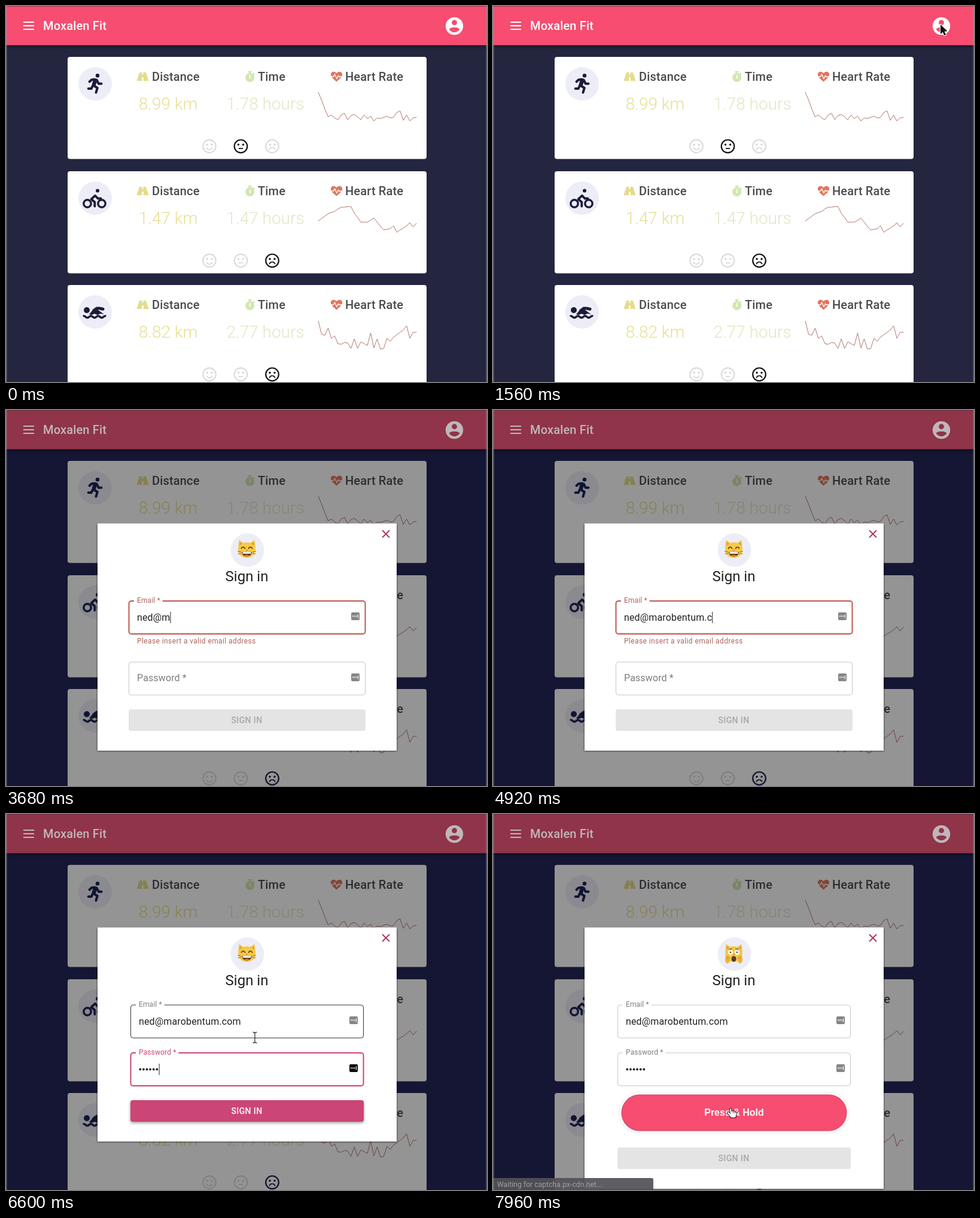
Recreate the animation shown at these times as an HTML page with a canvas. Size 804 by 628 pixels, loop 8000 ms.

```html
<!DOCTYPE html>
<html lang="en">
<head>
<meta charset="utf-8">
<title>Workout dashboard</title>
<style>
  html, body { margin: 0; width: 100%; height: 100%; overflow: hidden; background: #24263f; }
  canvas { display: block; width: 804px; height: 628px; }
</style>
</head>
<body>
<canvas id="stage" width="804" height="628"></canvas>
<script>
const ctx = document.getElementById('stage').getContext('2d');
const W = 804, H = 628, LOOP = 8000;
const PINK = '#f64d70', BUTTON = '#cc4577', INK = '#1b1c38', ERROR = '#bd574f';
const EMAIL = 'ned@marobentum.com';

// Moments in ms
const OPEN = 1560, FOCUS_EMAIL = 2560, TYPE_EMAIL = 3200, EMAIL_STEP = 110;
const FOCUS_PASS = 5260, TYPE_PASS = 5420, PASS_STEP = 150;
const SUBMIT = 7240, CHALLENGE = 7600;

const clamp = v => Math.max(0, Math.min(1, v));
const ease = v => v * v * (3 - 2 * v);
const span = (t, from, length) => ease(clamp((t - from) / length));
const lerp = (a, b, k) => a + (b - a) * k;
const typed = (t, from, step, max) => t < from ? 0 : Math.min(max, 1 + Math.floor((t - from) / step));

function mix(a, b, k) {
  const part = (c, i) => parseInt(c.slice(i, i + 2), 16);
  return `rgb(${[1, 3, 5].map(i => Math.round(lerp(part(a, i), part(b, i), k))).join(',')})`;
}
function rect(x, y, w, h, color, r = 0) {
  ctx.beginPath();
  ctx.roundRect(x, y, w, h, r);
  ctx.fillStyle = color;
  ctx.fill();
}
function oval(x, y, rx, color, ry = rx) {
  ctx.beginPath();
  ctx.ellipse(x, y, rx, ry, 0, 0, 7);
  ctx.fillStyle = color;
  ctx.fill();
}
function trace(points) {
  ctx.beginPath();
  for (let i = 0; i < points.length; i += 2) ctx.lineTo(points[i], points[i + 1]);
}
function line(points, color, width, cap = 'round') {
  trace(points);
  ctx.strokeStyle = color;
  ctx.lineWidth = width;
  ctx.lineCap = cap;
  ctx.lineJoin = 'round';
  ctx.stroke();
}
function poly(points, color) {
  trace(points);
  ctx.fillStyle = color;
  ctx.fill();
}
function arc(x, y, r, from, to, color, width) {
  ctx.beginPath();
  ctx.arc(x, y, r, from, to);
  ctx.strokeStyle = color;
  ctx.lineWidth = width;
  ctx.lineCap = 'round';
  ctx.stroke();
}
function text(str, x, y, size, color, { weight = 400, align = 'left', gap = 0, family = 'Roboto' } = {}) {
  ctx.font = `${weight} ${size}px ${family}, sans-serif`;
  ctx.letterSpacing = gap + 'px';
  ctx.textAlign = align;
  ctx.fillStyle = color;
  ctx.fillText(str, x, y);
  return ctx.measureText(str).width;
}
function at(x, y, draw) {
  ctx.save();
  ctx.translate(x, y);
  draw();
  ctx.restore();
}

// Sport icons
function runner() {
  at(135.5, 28, () => {
    oval(17.5, 3.2, 3.2, INK);
    line([4, 13.5, 7.5, 10.3, 13, 9.5, 16, 11], INK, 4);
    line([13.5, 11.5, 11.3, 18.5], INK, 6.5);
    line([16, 10.5, 19.3, 16.8, 24, 16.8], INK, 4);
    line([11, 20, 17.3, 23.8, 15, 31.5], INK, 4);
    line([2.2, 25, 7.2, 25, 9, 21], INK, 4);
  });
}
function cyclist() {
  at(128, 29.5, () => {
    arc(8, 24.5, 6.2, 0, 7, INK, 3.4);
    arc(32, 24.5, 6.2, 0, 7, INK, 3.4);
    oval(25, 3, 3, INK);
    line([20.3, 29, 20.3, 22, 14.5, 17.2, 21, 11.2, 25.5, 16, 30.5, 16], INK, 3.8);
  });
}
function swimmer() {
  at(128, 30.5, () => {
    oval(7, 11.5, 5, INK);
    poly([11, 18.5, 18, 10, 25, 10.5, 36, 18.5, 30, 17.3, 25, 19.5, 20, 17.5, 15, 19.5], INK);
    line([19, 12, 24, 8.4, 28, 8.4, 34, 9.8], INK, 5);
    const wave = [];
    for (let x = 2; x <= 38; x++) wave.push(x, 22.7 - 1.5 * Math.cos((x - 2) * Math.PI / 6));
    line(wave, INK, 3.4);
  });
}

const CARDS = [
  { y: 85, icon: runner, distance: '8.99 km', time: '1.78 hours', mood: 1,
    pulse: [59, 72, 87, 100, 97, 102, 105, 97, 94, 105, 98, 96, 100, 105, 97, 103, 99, 107, 102,
      103, 101, 99, 102, 101, 93, 90, 106, 97, 107, 102, 101] },
  { y: 276, icon: cyclist, distance: '1.47 km', time: '1.47 hours', mood: 2,
    pulse: [83, 79, 75, 71, 69, 67, 63, 60, 60, 59, 59, 70, 77, 85, 85, 85, 82, 78, 85, 92, 98,
      97, 96, 91, 102, 98, 95, 91, 86, 93, 87] },
  { y: 466, icon: swimmer, distance: '8.82 km', time: '2.77 hours', mood: 2,
    pulse: [60, 82, 84, 72, 89, 85, 98, 99, 96, 97, 106, 90, 106, 95, 98, 101, 80, 105, 90, 107,
      106, 89, 94, 87, 83, 79, 75, 68, 89, 79, 79] }
];

function road(x, y) {
  poly([x + 4.5, y, x + 15.5, y, x + 20, y + 14, x, y + 14], '#e5dc8b');
  line([x + 10, y, x + 10, y + 4], '#fff', 1.8, 'butt');
  line([x + 10, y + 8, x + 10, y + 14], '#fff', 2.6, 'butt');
}
function stopwatch(x, y) {
  const c = '#d2e7b3';
  oval(x, y, 7.6, c);
  line([x - 2.2, y - 9.5, x + 2.2, y - 9.5], c, 2.4);
  line([x, y - 9, x, y - 6], c, 2.4);
  line([x + 5.5, y - 6.5, x + 6.5, y - 5.5], c, 2.6);
  line([x, y - 3.5, x, y + 1], '#fff', 1.8);
}
function heart(x, y) {
  at(x, y, () => {
    ctx.beginPath();
    ctx.moveTo(0, 8.5);
    ctx.bezierCurveTo(-4, 4.5, -9.6, 1, -9.6, -3.5);
    ctx.bezierCurveTo(-9.6, -8.7, -3, -10, 0, -5.6);
    ctx.bezierCurveTo(3, -10, 9.6, -8.7, 9.6, -3.5);
    ctx.bezierCurveTo(9.6, 1, 4, 4.5, 0, 8.5);
    ctx.fillStyle = '#e2755f';
    ctx.fill();
    line([-9.5, 0, -5, 0, -3, -4, 0.5, 3.5, 3, -1.5, 4, 0, 9.5, 0], '#fff', 1.4);
  });
}
function face(x, y, mood, chosen) {
  const c = chosen ? '#151515' : '#d8d8d8';
  arc(x, y, 10.8, 0, 7, c, chosen ? 2.2 : 1.9);
  oval(x - 4, y - 2.8, 1.7, c);
  oval(x + 4, y - 2.8, 1.7, c);
  if (mood === 0) arc(x, y + 0.8, 5, 0.4, Math.PI - 0.4, c, 1.7);
  if (mood === 1) line([x - 3.6, y + 3.6, x + 3.6, y + 3.6], c, 1.8, 'butt');
  if (mood === 2) arc(x, y + 7.2, 5, Math.PI + 0.4, -0.4, c, 1.7);
}
function card({ y, icon, distance, time, mood, pulse }) {
  at(0, y, () => {
    rect(103, 0, 600, 170.5, '#fff', 4);
    oval(149, 45, 28, '#ededf8');
    icon();
    road(218.5, 26);
    stopwatch(407.7, 34.5);
    heart(552.5, 33);
    const head = { weight: 500, gap: 0.15 };
    text('Distance', 244, 40, 20, '#4b4b4d', head);
    text('Time', 421, 40, 20, '#4b4b4d', head);
    text('Heart Rate', 567, 40, 20, '#4b4b4d', head);
    text(distance, 271, 88, 28, '#e6df91', { weight: 300, align: 'center' });
    text(time, 433.5, 88, 28, '#dde8c4', { weight: 300, align: 'center' });
    line(pulse.flatMap((v, i) => [522 + i * 164 / 30, v]), '#b3766c', 1);
    for (let i = 0; i < 3; i++) face(340 + i * 52.5, 149.3, i, i === mood);
  });
}

function topBar(dim) {
  const back = mix(PINK, '#8f3449', dim), front = mix('#ffffff', '#c0b6b9', dim);
  ctx.save();
  ctx.shadowColor = 'rgba(0,0,0,.45)';
  ctx.shadowBlur = 6;
  ctx.shadowOffsetY = 2;
  rect(0, 0, W, 65.5, back);
  ctx.restore();
  for (let y = 26; y <= 38; y += 6) rect(29, y, 18, 2, front);
  text('Moxalen Fit', 62, 40, 20, front, { weight: 500, gap: 0.15 });
  at(749.5, 33.5, () => {
    oval(0, 0, 14.7, front);
    oval(0, -5.8, 4.4, back);
    ctx.beginPath();
    ctx.moveTo(-8.8, 5.8);
    ctx.bezierCurveTo(-8.5, 1, 8.5, 1, 8.8, 5.8);
    ctx.quadraticCurveTo(5, 10.5, 0, 10.5);
    ctx.quadraticCurveTo(-5, 10.5, -8.8, 5.8);
    ctx.fillStyle = back;
    ctx.fill();
  });
}

function cat(x, y, scared) {
  at(x, y, () => {
    const fur = '#f6c945', dark = '#5b3a1c';
    for (const s of [-1, 1]) {
      poly([s * 13, -16, s * 14.5, -2, s * 3, -9], fur);
      poly([s * 11.8, -12.5, s * 12.3, -5, s * 6.5, -9], '#e0965a');
    }
    oval(0, 1, 14.5, fur, 13);
    if (scared) {
      for (const s of [-1, 1]) {
        oval(s * 5.5, -2, 4.2, '#fff');
        oval(s * 5.5, -2, 1.3, dark);
        line([s * 3, -8, s * 8, -7], dark, 1);
      }
      oval(0, 9, 4, dark, 4.8);
      for (const s of [-1, 1]) {
        oval(s * 10.5, 10, 4, '#e9b33a', 6.5);
        line([s * 8.5, 5, s * 8.5, 9], '#c98b25', 0.8);
        line([s * 11, 4.5, s * 11, 9], '#c98b25', 0.8);
      }
    } else {
      for (const s of [-1, 1]) {
        arc(s * 6, -1, 3, Math.PI + 0.2, -0.2, dark, 1.6);
        line([s * 10, 4, s * 15, 3], dark, 0.7);
        line([s * 10, 6.5, s * 14.5, 7.5], dark, 0.7);
      }
      ctx.beginPath();
      ctx.moveTo(-8.5, 4);
      ctx.lineTo(8.5, 4);
      ctx.bezierCurveTo(8, 14, -8, 14, -8.5, 4);
      ctx.fillStyle = dark;
      ctx.fill();
      rect(-7.2, 4.2, 14.4, 2.8, '#fff', 1);
      oval(0, 9.8, 3.6, '#e0685a', 1.4);
    }
    poly([-1.8, 0.8, 1.8, 0.8, 0, 2.8], '#c4694f');
  });
}

function field(x, y, w, label, state) {
  const { raise, focus, error, hover, dark } = state;
  const edge = error ? ERROR : focus ? BUTTON : hover ? '#303030' : '#c6c6c6';
  const thick = focus ? 2 : 1;
  ctx.beginPath();
  ctx.roundRect(x + 0.5, y, w - 1, 55, 4);
  ctx.strokeStyle = edge;
  ctx.lineWidth = thick;
  ctx.stroke();
  if (raise > 0) {
    ctx.font = '400 12px Roboto, sans-serif';
    ctx.letterSpacing = '0.12px';
    rect(x + 9, y - 2, (ctx.measureText(label).width + 9) * raise, 4, '#fff');
  }
  const tint = error ? '#b2635c' : focus ? BUTTON : '#7d7d7d';
  text(label, x + 14, y + lerp(32, 3, raise), lerp(16, 12, raise), tint, { gap: 0.13 });
  at(x + w - 24, y + 19, () => {
    rect(0, 0, 14, 13, dark ? '#0c0c0c' : '#868686', 2);
    for (let i = 0; i < 3; i++) rect(2 + i * 2.8, 5.5, 1.8, 1.8, '#fff');
    rect(10.8, 3.5, 1.2, 6, '#fff');
  });
}
function caret(x, y, t, since) {
  if ((t - since) % 1000 < 500) rect(x, y + 18, 1, 19, '#222');
}
function helper(str, x, y) {
  text(str, x + 14, y + 71, 12, '#ad645d', { gap: 0.4 });
}

function dialog(t) {
  const chars = typed(t, TYPE_EMAIL, EMAIL_STEP, EMAIL.length);
  const dots = typed(t, TYPE_PASS, PASS_STEP, 6);
  const mail = EMAIL.slice(0, chars);
  const badMail = chars > 0 && !/@\w+\.\w{2,}$/.test(mail);
  const badPass = dots > 0 && dots < 6;
  const bad = badMail || badPass;
  const challenge = t >= CHALLENGE;
  const x = bad ? 205 : 208, w = bad ? 396 : 390;
  const passY = badMail ? 421 : 399;
  const buttonY = challenge ? 557 : bad ? 500 : 478;

  ctx.save();
  ctx.shadowColor = 'rgba(0,0,0,.75)';
  ctx.shadowBlur = 3;
  ctx.shadowOffsetY = 1;
  rect(153, 189.5, 500, buttonY + 69 - 189.5, '#fff');
  ctx.restore();
  line([629, 201, 641, 213], '#a93c5e', 2, 'butt');
  line([641, 201, 629, 213], '#a93c5e', 2, 'butt');
  oval(403.5, 234, 28, '#ededf8');
  cat(402.5, 233, t >= SUBMIT);
  text('Sign in', 402.5, 286, 24, '#222', { align: 'center' });

  const onMail = t >= FOCUS_EMAIL && t < FOCUS_PASS;
  const onPass = t >= FOCUS_PASS && t < SUBMIT - 60;
  field(x, 319, w, 'Email *', {
    raise: span(t, FOCUS_EMAIL, 200), focus: onMail, error: badMail, hover: t > 2380 && t < 6620
  });
  const mailWidth = text(mail, x + 14, 352, 16, '#222', { gap: 0.15 });
  if (onMail) caret(x + 14 + mailWidth, 319, t, chars ? Math.min(t, TYPE_EMAIL + (chars - 1) * EMAIL_STEP) : FOCUS_EMAIL);
  if (badMail) helper('Please insert a valid email address', x, 319);

  field(x, passY, w, 'Password *', {
    raise: span(t, FOCUS_PASS, 200), focus: onPass, error: badPass,
    hover: t >= 6620 && t < 6820, dark: onPass
  });
  for (let i = 0; i < dots; i++) oval(x + 16.3 + i * 5.6, passY + 27.5, 1.9, '#222');
  if (onPass) caret(x + 14 + dots * 5.6, passY, t, dots ? TYPE_PASS + (dots - 1) * PASS_STEP : FOCUS_PASS);
  if (badPass) helper('Password must be at least 6 characters long', x, passY);

  if (challenge) {
    rect(209, 463, 388, 72, '#fbf6f8', 36);
    rect(214.5, 468.5, 377, 61, '#c94a6a', 30.5);
    rect(215.5, 469.5, 375, 59, PINK, 29.5);
    text('Press & Hold', 403, 504, 16, '#fff', { weight: 700, align: 'center', family: '"Liberation Sans"' });
  }
  const live = dots === 6 ? span(t, TYPE_PASS + 5 * PASS_STEP, 250) * (1 - span(t, SUBMIT, 250)) : 0;
  ctx.save();
  ctx.shadowColor = `rgba(0,0,0,${0.4 * live})`;
  ctx.shadowBlur = 5;
  ctx.shadowOffsetY = 2;
  rect(x, buttonY, w, 36, mix('#e4e4e4', BUTTON, live), 4);
  ctx.restore();
  const caption = t >= SUBMIT ? mix('#a8a8a8', '#a3385f', live) : mix('#a8a8a8', '#ffffff', live);
  text('SIGN IN', 402.5, buttonY + 23, 14, caption, { weight: 500, align: 'center', gap: 0.4 });
}

// Pointer stops: time, x, y
const PATH = [
  [700, 803, 110], [1240, 748, 31], [1660, 748, 31], [2420, 420, 347],
  [6420, 420, 347], [7080, 398, 490], [7500, 398, 490]
];
function pointer(t) {
  if (t < PATH[0][0] || (t > 3150 && t < 6380)) return;
  let i = PATH.findIndex(p => p[0] > t);
  if (i < 0) i = PATH.length - 1;
  const [t0, x0, y0] = PATH[i - 1], [t1, x1, y1] = PATH[i];
  const k = span(t, t0, t1 - t0);
  const x = lerp(x0, x1, k), y = lerp(y0, y1, k);
  at(x, y, () => {
    if (t >= CHALLENGE) return hand();
    if (y > 319 && y < 374 && t > OPEN + 200 && x < 598) return beam();
    const shape = [0, 0, 0, 16, 3.8, 12.5, 6.4, 18.3, 9, 17.1, 6.5, 11.5, 11.5, 11.3, 0, 0];
    line(shape, '#fff', 2);
    poly(shape, '#111');
  });
}
function beam() {
  line([0, -8, 0, 8], '#222', 1.2);
  line([-3, -9, 0, -8, 3, -9], '#222', 1.2);
  line([-3, 9, 0, 8, 3, 9], '#222', 1.2);
}
function hand() {
  const fingers = [[-1, 3, 0, 12], [2, 7, 2, 12], [5, 7.5, 5, 12], [8, 9, 7, 13], [-4.5, 9, 0, 15]];
  for (const [color, grow] of [['#222', 2], ['#fff', 0]]) {
    fingers.forEach(f => line(f, color, 2.2 + grow));
    rect(-1 - grow / 2, 10 - grow / 2, 9 + grow, 7 + grow, color, 3);
  }
}

function statusBar() {
  rect(0, 608, 268, 20, 'rgba(82,82,86,.92)', [0, 3, 0, 0]);
  text('Waiting for captcha.px-cdn.net...', 7, 623, 12, '#a2a2a4', { gap: 0.1 });
}
function windowEdge() {
  rect(0, 0, W, 1, 'rgba(70,50,60,.55)');
  rect(0, 0, 1.5, H, 'rgba(150,150,165,.55)');
  rect(W - 1.5, 0, 1.5, H, 'rgba(150,150,165,.55)');
}

function draw(t) {
  const dim = span(t, OPEN, 225);
  rect(0, 0, W, H, '#24263f');
  CARDS.forEach(card);
  if (dim > 0) {
    rect(0, 0, W, H, `rgba(0,0,0,${0.42 * dim})`);
    ctx.globalCompositeOperation = 'lighten';
    rect(0, 0, W, H, mix('#000000', '#0c1434', dim));
    ctx.globalCompositeOperation = 'source-over';
  }
  topBar(dim);
  if (dim > 0) {
    ctx.globalAlpha = dim;
    dialog(t);
    ctx.globalAlpha = 1;
  }
  if (t >= SUBMIT + 260) statusBar();
  windowEdge();
  pointer(t);
}

const start = performance.now();
function tick() {
  draw((performance.now() - start) % LOOP);
  requestAnimationFrame(tick);
}
tick();
</script>
</body>
</html>
```
